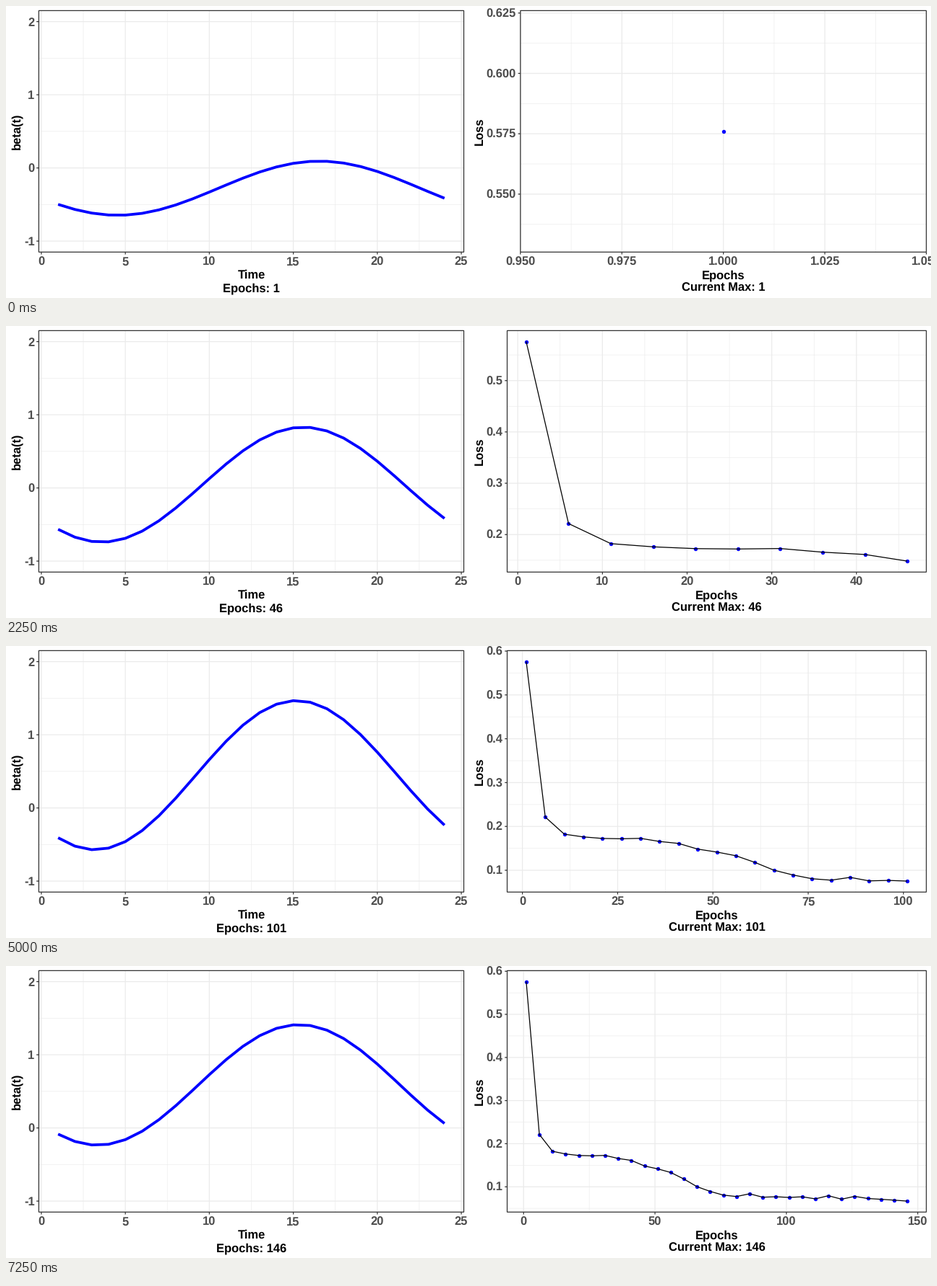
Write a matplotlib script that moves like this. It is 1280 px wide and 405 px high and loops after 7.5 s.

```python
import math

import matplotlib.pyplot as plt
import numpy as np
from matplotlib.animation import FuncAnimation
from matplotlib.patches import Rectangle

W, H, DPI = 1280, 405, 80
FRAMES, INTERVAL = 30, 250
PT = 72 / DPI            # points per pixel
U = 1.18                 # pixels per plot unit
THIN = 1.067 * U
FONT = 14 * U
TOP, BOTTOM = 6.4, 341.3

plt.rcParams.update({
    "font.family": "Liberation Sans",
    "font.weight": "bold",
    "text.hinting": "none",
    "path.snap": False,
})

LOSS = np.array([
    .576, .2214, .1823, .1761, .1726, .1719, .1728, .1657, .1612, .1483,
    .1416, .1332, .1180, .1002, .0893, .0807, .0774, .0838, .0758, .0769,
    .0753, .0768, .0720, .0793, .0712, .0778, .0728, .0710, .0690, .0668])
EPOCHS = 1 + 5 * np.arange(FRAMES)

# Level, amplitude and peak hour of the daily wave at a few epochs
KEYS = np.array([
    [1, -.277, .370, 16.55],
    [31, -.090, .608, 15.85],
    [46, .045, .786, 15.60],
    [66, .242, 1.022, 15.40],
    [86, .380, 1.062, 15.25],
    [121, .5115, .920, 15.20],
    [146, .588, .824, 15.35]])
OMEGA = 2 * math.pi / 24
HOURS = np.arange(1, 25)


def hermite(x, xs, ys):
    """Smooth curve through the points (xs, ys)."""
    slope = np.gradient(ys, xs)
    i = min(max(np.searchsorted(xs, x) - 1, 0), len(xs) - 2)
    h = xs[i + 1] - xs[i]
    s = (x - xs[i]) / h
    return ((1 + 2 * s) * (1 - s) ** 2 * ys[i] + s * (1 - s) ** 2 * h * slope[i]
            + s * s * (3 - 2 * s) * ys[i + 1] - s * s * (1 - s) * h * slope[i + 1])


def beta(epoch):
    at, level, amp, peak = KEYS.T
    mean = hermite(epoch, at, level)
    c = hermite(epoch, at, amp * np.cos(OMEGA * peak))
    s = hermite(epoch, at, amp * np.sin(OMEGA * peak))
    return mean + c * np.cos(OMEGA * HOURS) + s * np.sin(OMEGA * HOURS)


def nice_step(lo, hi, m=5):
    """Tick step with the best mix of simplicity, coverage and density."""
    best, best_step = -1e9, 1
    span = hi - lo
    for i, q in enumerate((1, 5, 2, 2.5, 4, 3)):
        for k in range(2, 11):
            z0 = math.ceil(math.log10(span / (k + 1) / q))
            for z in (z0, z0 + 1):
                step = q * 10.0 ** z
                first = math.floor(hi / step) - k + 1
                for start in range(first, math.ceil(lo / step) + 1):
                    a, b = start * step, (start + k - 1) * step
                    simple = -i / 5 + (start <= 0 <= start + k - 1)
                    cover = 1 - .5 * ((hi - b) ** 2 + (lo - a) ** 2) / (.1 * span) ** 2
                    r = (k - 1) / (b - a)
                    rt = (m - 1) / (max(b, hi) - min(a, lo))
                    score = .25 * simple + .2 * cover + .5 * (2 - max(r / rt, rt / r))
                    if score > best + 1e-9:
                        best, best_step = score, step
    return best_step


def multiples(lo, hi, step, offset=0):
    first = math.ceil((lo - offset) / step - 1e-6)
    last = math.floor((hi - offset) / step + 1e-6)
    return [n * step + offset for n in range(first, last + 1)]


def view(values):
    lo, hi = min(values), max(values)
    pad = .05 * (hi - lo) or .05
    return lo - pad, hi + pad


def decimals(ticks):
    return next(d for d in range(6)
                if all(abs(round(t, d) - t) < 1e-7 for t in ticks))


def line(x, y, color, width, z):
    ax.plot(x, y, color=color, lw=width * PT, zorder=z,
            solid_capstyle="butt", solid_joinstyle="round")


def label(x, y, text, color="black", ha="center", rotation=0):
    ax.text(x, y, text, color=color, ha=ha, va="baseline", fontsize=FONT * PT,
            rotation=rotation, rotation_mode="anchor", zorder=8)


def panel(left, right, xlim, ylim, xstep, ystep):
    """Draw grid, ticks and border; return the data-to-pixel mappings."""
    def px(v):
        return left + (np.asarray(v) - xlim[0]) / (xlim[1] - xlim[0]) * (right - left)

    def py(v):
        return BOTTOM - (np.asarray(v) - ylim[0]) / (ylim[1] - ylim[0]) * (BOTTOM - TOP)

    xt, yt = multiples(*xlim, xstep), multiples(*ylim, ystep)
    for xs, ys, width, z in (
            (multiples(*xlim, xstep, xstep / 2), multiples(*ylim, ystep, ystep / 2), THIN / 2, 1),
            (xt, yt, THIN, 2)):
        for x in px(xs):
            line([x, x], [TOP, BOTTOM], "#ebebeb", width, z)
        for y in py(ys):
            line([left, right], [y, y], "#ebebeb", width, z)

    tick = 2.75 * U
    for v, x in zip(xt, px(xt)):
        line([x, x], [BOTTOM, BOTTOM + tick], "#333333", THIN, 6)
        label(x, 359.8, f"{v:.{decimals(xt)}f}", "#4d4d4d")
    for v, y in zip(yt, py(yt)):
        line([left - tick, left], [y, y], "#333333", THIN, 6)
        label(left - 4.95 * U, y + 5.9, f"{v:.{decimals(yt)}f}", "#4d4d4d", "right")
    ax.add_patch(Rectangle((left, TOP), right - left, BOTTOM - TOP, fill=False,
                           ec="#333333", lw=THIN * PT, zorder=7))
    return px, py


def titles(left, right, x_name, note, y_name, y_x):
    mid = (left + right) / 2
    label(mid, 378, x_name)
    label(mid, 396, note)
    label(y_x, (TOP + BOTTOM) / 2, y_name, rotation=90)


def draw_wave(epoch):
    left, right = 45.4, 633.5
    px, py = panel(left, right, view((1, 24)), view((-1, 2)), 5, 1)
    line(px(HOURS), py(beta(epoch)), "#0000ff", 3.8, 4)
    titles(left, right, "Time", f"Epochs: {epoch}", "beta(t)", 19)


def draw_loss(i):
    x, y = EPOCHS[:i + 1], LOSS[:i + 1]
    xlim, ylim = view(x), view(y)
    xstep, ystep = nice_step(*xlim), nice_step(*ylim)
    digits = decimals(multiples(*ylim, ystep))
    left, right = 693.5 + .556 * FONT * (digits - 1), 1273.5
    px, py = panel(left, right, xlim, ylim, xstep, ystep)
    ax.plot(px(x), py(y), "o", color="#0000ff", ms=5.4 * PT, mew=0, zorder=3)
    if i:
        line(px(x), py(y), "black", THIN, 4)
    titles(left, right, "Epochs", f"Current Max: {x[-1]}", "Loss", 659.5)


def draw(i):
    ax.clear()
    ax.set_xlim(0, W)
    ax.set_ylim(H, 0)
    ax.axis("off")
    draw_wave(int(EPOCHS[i]))
    draw_loss(i)
    return []


fig = plt.figure(figsize=(W / DPI, H / DPI), dpi=DPI, facecolor="white")
ax = fig.add_axes([0, 0, 1, 1])
anim = FuncAnimation(fig, draw, frames=FRAMES, interval=INTERVAL,
                     init_func=lambda: draw(0), repeat=True, repeat_delay=0)
plt.show()
```
